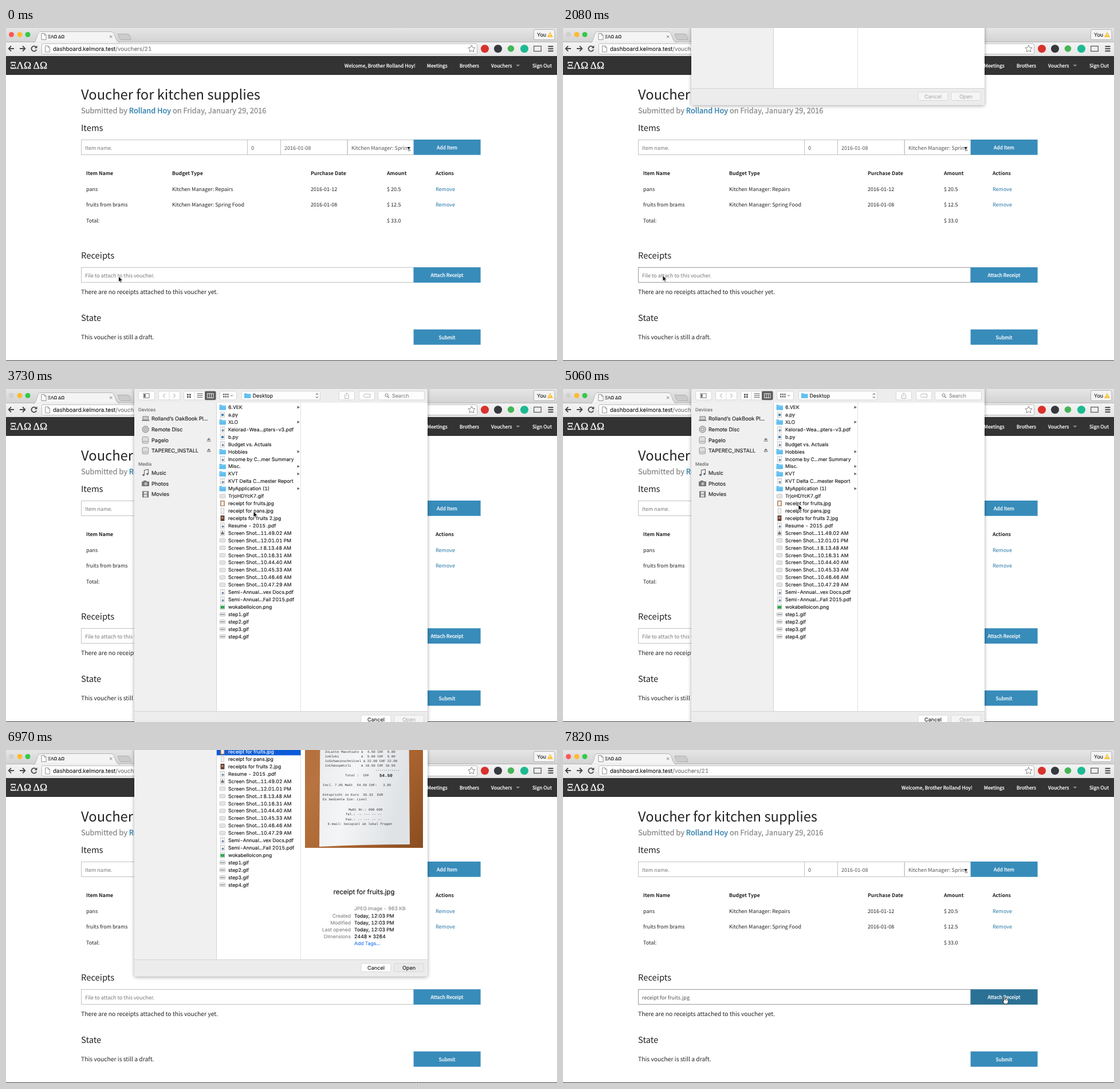
Write an HTML page that moves like this. It is 962 px wide and 582 px high and loops after 8 s.

```html
<!DOCTYPE html>
<html lang="en">
<head>
<meta charset="utf-8">
<title>Voucher dashboard</title>
<style>
html, body { margin: 0; width: 100%; height: 100%; overflow: hidden; background: #fff; }
svg { display: block; width: 962px; height: 582px; }
text { white-space: pre; text-rendering: geometricPrecision; }
.page { font-family: "Noto Sans CJK JP", "Noto Sans CJK SC", "Noto Sans CJK", "Open Sans", sans-serif; }
.ui { font-family: Inter, Roboto, sans-serif; font-variant-numeric: tabular-nums; stroke: currentColor; stroke-width: .15; }
.serif { font-family: "Liberation Serif", "Noto Serif", serif; }
.mono { font-family: "Liberation Mono", "DejaVu Sans Mono", monospace; }
</style>
</head>
<body>
<svg id="stage" viewBox="0 0 962 582" xmlns="http://www.w3.org/2000/svg"></svg>
<script>
const LOOP = 8000;

// ---- markup helpers ----
const attrs = o => Object.entries(o).map(([k, v]) => ` ${k}="${v}"`).join('');
const rect = (x, y, w, h, fill, o = {}) =>
  `<rect x="${x}" y="${y}" width="${w}" height="${h}" fill="${fill}"${attrs(o)}/>`;
const disc = (x, y, r, fill, o = {}) => `<circle cx="${x}" cy="${y}" r="${r}" fill="${fill}"${attrs(o)}/>`;
const path = (d, fill, o = {}) => `<path d="${d}" fill="${fill}"${attrs(o)}/>`;
const line = (d, stroke, width = 1, o = {}) => path(d, 'none', { stroke, 'stroke-width': width, ...o });
const text = (cls, x, y, size, fill, str, o = {}) =>
  `<text class="${cls}" x="${x}" y="${y}" font-size="${size}" fill="${fill}" color="${fill}"${attrs(o)}>${str}</text>`;
const group = (id, body, o = {}) => `<g id="${id}"${attrs(o)}>${body}</g>`;
const page = (...a) => text('page', ...a);
const ui = (...a) => text('ui', ...a);
const mid = { 'text-anchor': 'middle' };
const end = { 'text-anchor': 'end' };
const heavy = (c, w = .25) => ({ stroke: c, 'stroke-width': w });

// ---- browser frame ----
const letters = 'ΞΛΩ ΔΩ';
const sheetIcon = (x, y) =>
  path(`M${x} ${y}h5l3 3v8h-8zM${x + 5} ${y}v3h3`, '#fff', { stroke: '#777', 'stroke-width': .8 });

const browser = () => rect(0, 0, 962, 25, 'url(#strip)') +
  rect(0, 24, 962, 25, 'url(#bar)') + line('M0 24.5H962', '#b4b4b4') +
  path('M48 25C55 25 53 6.5 60 6.5H184C191 6.5 190 25 198 25Z', '#f4f4f4', { stroke: '#ababab', 'stroke-width': .8 }) +
  rect(50, 24.5, 146, 1.5, '#f4f4f4') +
  path('M195 10.5H212Q215 10.5 216 13L218 20.5H202Q199 20.5 198 18Z', '#cbcbcb', { stroke: '#a8a8a8', 'stroke-width': .8 }) +
  disc(9.5, 11.5, 4.5, '#fc5753', { id: 'closeDot' }) + disc(24, 11.5, 4.5, '#fdbb32') + disc(38, 11.5, 4.5, '#36c84b') +
  sheetIcon(62, 9.5) + ui(73, 18, 7.6, '#111', letters) +
  line('M181 13l4.4 4.4M185.4 13l-4.4 4.4', '#777', 1) +
  rect(921.5, 2.5, 36.5, 18, '#f4f4f4', { rx: 2.5, stroke: '#b2b2b2' }) + ui(927, 15.2, 9, '#222', 'You') +
  path('M950 6.8L955 16H945Z', '#f8c231') + line('M950 10v3M950 14v1', '#fff', 1) +
  line('M14 36H5M9 31.5L4.6 36L9 40.5', '#484848', 1.8) +
  line('M24 36H33M29 31.5L33.4 36L29 40.5', '#484848', 1.8) +
  line('M52.6 33.5A4.5 4.5 0 1 0 53.2 37.5', '#484848', 1.8) + path('M54.4 30.5V35.3H49.6Z', '#484848') +
  rect(62.5, 27.5, 760, 18, '#fff', { rx: 2, stroke: '#b9b9b9' }) + sheetIcon(68.5, 31) +
  ui(82, 39.8, 9.85, '#222', 'dashboard.kelmora.test<tspan fill="#777" color="#777">/vouchers/21</tspan>') +
  path('M813 30l1.9 4 4.3.5-3.2 3 .9 4.3-3.9-2.2-3.9 2.2.9-4.3-3.2-3 4.3-.5z', '#fff', { stroke: '#777', 'stroke-width': .9 }) +
  disc(836, 36.3, 7, '#d8322c') + disc(859, 36.3, 7, '#37393f') + disc(881.5, 36, 5.8, '#45b556') +
  disc(905, 36.3, 7, '#1cba93') +
  rect(921.7, 31.6, 12.6, 9, 'none', { stroke: '#555', 'stroke-width': 1.2 }) +
  line('M946.5 32.2h9M946.5 36.2h9M946.5 40.2h9', '#444', 1.9);

// ---- web page ----
const person = 'Rolland Hoy';
const white = heavy('#fff', .28);
const button = (y, label, id = 'b' + y) =>
  rect(711.6, y, 117, 26.8, '#388cba', { id }) + page(770, y + 16.8, 8.55, '#fff', label, { ...mid, ...white });
const field = (x, y, w, id = 'i' + x) => rect(x + .5, y + .5, w, 26, '#fff', { id, stroke: '#c2c2c2' });
const cols = [140, 290, 532, 665, 750];
const row = (y, cells, o = {}, size = 9) => cells.map((c, i) =>
  c && page(cols[i], y, size, c === 'Remove' ? '#2678a8' : '#222', c, o)).join('');

const site = () => rect(0, 49, 962, 533, '#fff') + rect(0, 49, 962, 33, '#333') +
  text('serif', 7, 71, 17.6, '#fff', letters, heavy('#fff', .3)) +
  [[591, `Welcome, Brother ${person}!`], [735, 'Meetings'], [792, 'Brothers'], [847, 'Vouchers'], [919, 'Sign Out']]
    .map(([x, s]) => page(x, 69, 8.5, '#fff', s, white)).join('') +
  path('M890.3 64h7l-3.5 3.6z', '#8b8b8b') +
  page(131, 125.3, 23.75, '#222', 'Voucher for kitchen supplies') +
  page(131, 148.7, 12.92, '#888', `Submitted by <tspan fill="#2678a8" stroke="#2678a8">${person}</tspan> on Friday, January 29, 2016`, heavy('#888')) +
  page(131, 180, 14.8, '#222', 'Items') +
  field(131, 195, 290) + field(421, 195, 58) + field(479, 195, 116.5) + field(596, 195, 116) +
  page(138, 212.5, 9.05, '#777', 'Item name.') + page(428, 212.5, 9.05, '#555', '0') +
  page(486, 212.5, 9.05, '#555', '2016-01-08') + page(603, 212.5, 9.05, '#555', 'Kitchen Manager: Spring') +
  path('M700.5 208h5l-2.5 4z', '#111') + button(195, 'Add Item') +
  row(257, ['Item Name', 'Budget Type', 'Purchase Date', 'Amount', 'Actions'], { 'font-weight': 700 }, 8.75) +
  row(285, ['pans', 'Kitchen Manager: Repairs', '2016-01-12', '$ 20.5', 'Remove']) +
  row(312.3, ['fruits from brams', 'Kitchen Manager: Spring Food', '2016-01-08', '$ 12.5', 'Remove']) +
  row(339.6, ['Total:', '', '', '$ 33.0', '']) +
  page(131, 403, 14.8, '#222', 'Receipts') +
  field(131, 418, 580.5, 'fileBox') + page(138, 435.8, 9.05, '#777', '', { id: 'fileText' }) +
  button(418.2, 'Attach Receipt', 'attach') +
  page(131, 465, 10.32, '#222', 'There are no receipts attached to this voucher yet.') +
  page(131, 511.7, 14.8, '#222', 'State') +
  page(131, 543.8, 10.32, '#222', 'This voucher is still a draft.') + button(526.8, 'Submit') +
  rect(0, 581, 962, 1, '#3a3d40');

// ---- file sheet: kind letter, then name ----
const shots = ['11.49.02 AM', '12.01.01 PM', 't 8.13.48 AM', '10.16.31 AM', '10.44.40 AM', '10.45.33 AM', '10.46.46 AM', '10.47.29 AM'];
const files = ['d6.VEK', 'pa.py', 'dXLO', 'fKelorad-Wea...pters-v3.pdf', 'pb.py', 'fBudget vs. Actuals', 'dHobbies',
  'fIncome by C...mer Summary', 'dMisc.', 'dKVT', 'fKVT Delta C...mester Report', 'dMyApplication (1)', 'gTrjoHDYcK7.gif',
  'rreceipt for fruits.jpg', 'breceipt for pans.jpg', 'breceipts for fruits 2.jpg', 'fResume - 2015 .pdf',
  ...shots.map((s, i) => (i ? 'g' : 'k') + 'Screen Shot...' + s),
  'fSemi-Annual...vex Docs.pdf', 'fSemi-Annual...Fall 2015.pdf', 'nwokabelloicon.png',
  'sstep1.gif', 'sstep2.gif', 'sstep3.gif', 'sstep4.gif'];
const thin = c => ({ stroke: c, 'stroke-width': .7 });
const leaf = y => rect(374.5, y - 4.8, 7, 9.6, '#fff', thin('#b3b3b3'));
const card = (y, c) => rect(373.3, y - 3, 9.4, 6.2, c, { rx: 1.2, ...thin('#a5a5a5') });
const icons = {
  d: y => path(`M372.5 ${y - 4.5}h4l1 1.2h6.5v8h-11.5z`, '#62bff0') + rect(372.5, y - 2.2, 11.5, .6, '#9ddcfa'),
  f: y => leaf(y) + rect(376, y - 3.3, 4, 1, '#c8c8c8') + disc(378.5, y + 1.5, 2, '#7489a3'),
  p: y => leaf(y) + rect(376, y - 1.8, 4.2, 4.2, '#4b83b5'),
  g: y => card(y, '#ececec') + rect(375, y - .3, 6, .8, '#c4c4c4'),
  s: y => card(y, '#f2f2f2') + rect(374.3, y - .4, 7.4, 1.3, '#777'),
  k: y => leaf(y) + rect(375.5, y - 1, 5, 4, '#777') + rect(377, y - 3, 2, 2.5, '#777'),
  r: y => rect(374.2, y - 4.8, 7.6, 9.6, '#a8683a') + rect(375.5, y - 3.6, 5, 7.4, '#f3f0ec'),
  b: y => rect(374.6, y - 4.8, 6.8, 9.6, '#60382b') + rect(376.2, y - 3, 3.4, 4.4, '#a88574'),
  n: y => leaf(y) + rect(374.5, y - 2.2, 7, 5.4, '#3aa657')
};
const fileRow = (name, i) => {
  const y = 32 + 12.92 * i;
  return icons[name[0]](y) +
    ui(388, y + 3.1, 8.6, '#1a1a1a', name.slice(1), { id: 'file' + i }) +
    (name[0] === 'd' ? path(`M508.5 ${y - 2.4}l4.4 2.4-4.4 2.4z`, '#666') : '');
};

const pill = (x, w, fill = '#fdfdfd') => rect(x + .5, 4, w, 15, fill, { rx: 2.5, stroke: '#d0d0d0', 'stroke-width': .8 });
const toolbar = () => pill(231, 28) + rect(240, 8, 10, 7.5, 'none', thin('#444')) + rect(241, 9, 2.6, 5.5, '#666') +
  pill(266, 37) + line('M285 4V19', '#d4d4d4', .8) +
  line('M277.5 8l-3 3.6 3 3.6M292.5 8l3 3.6-3 3.6', '#999', 1) +
  pill(310, 56) + rect(347, 3.8, 19.5, 15.4, '#5d5d5d', { rx: 2 }) + line('M329 4V19', '#d4d4d4', .8) +
  [0, 4].map(a => [0, 4].map(b => rect(316 + a, 8.5 + b, 2.8, 2.8, '#555')).join('')).join('') +
  line('M333.5 8.5h10M333.5 11.6h10M333.5 14.7h10', '#555', 1) +
  rect(351.5, 8, 10.5, 7.5, 'none', { stroke: '#fff', 'stroke-width': .9 }) + line('M355 8v7.5M358.5 8v7.5', '#fff', .9) +
  pill(373, 29) + [0, 3.6, 7.2].map(a => [0, 4].map(b => rect(379 + a, 8.2 + b, 2.5, 2.5, '#666')).join('')).join('') +
  line('M392 10.4l2 2 2-2', '#555', 1) +
  pill(411, 137) + path('M416 7.5h4l1 1h6.5v7.5h-11.5z', '#62bff0') + ui(430.5, 15, 9.1, '#222', 'Desktop') +
  line('M541 10l2-2.3 2 2.3M541 13.3l2 2.3 2-2.3', '#444', 1) +
  pill(581, 27) + pill(616, 27) + group('tools',
    line('M592.5 10h-1v6.5h7v-6.5h-1M595 13V7M593 8.7l2-2 2 2', 'currentColor', .9) +
    path('M623.5 11.6l2.5-2.8h9.5v5.6h-9.5z', 'none', { stroke: 'currentColor', 'stroke-width': .9 })) +
  pill(649, 81) + disc(664.5, 11, 2.6, 'none', { stroke: '#777' }) + line('M666.4 13l2.5 2.6', '#777', 1.1) +
  ui(674, 15, 9, '#888', 'Search');

const places = [['Rolland’s OakBook Pl...', 55], ['Remote Disc', 74], ['Pagelo', 92.6], ['TAPEREC_INSTALL', 111.2],
  ['Music', 150], ['Photos', 168.7], ['Movies', 187.4]];
const drive = y => rect(238, y - 5.5, 10.5, 11.5, '#ddd', { rx: 2, ...thin('#777') }) + line(`M239 ${y + 2.5}h8.5`, '#888', .8) +
  path(`M350.7 ${y}l3.4-3.6 3.4 3.6zM350.7 ${y + 1.2}h6.8v1.2h-6.8z`, '#777');
const sidebar = () => [['Devices', 38.8], ['Media', 133.7]].map(([s, y]) => ui(231, y, 7.9, '#777', s, { 'font-weight': 500 })).join('') +
  places.map(([s, y]) => ui(254, y, 9.2, '#222', s)).join('') +
  rect(239, 48, 9.5, 6, '#ccc', thin('#555')) + rect(237, 54.4, 13.5, 1.3, '#666') +
  disc(243.6, 70.5, 5.7, '#c5c5c5', thin('#666')) + disc(243.6, 70.5, 1.8, '#f4f4f4', thin('#777')) +
  drive(89) + drive(107.6) +
  line('M241.5 150v-8l7-1.5v8', '#666', 1.1) + disc(240, 150.3, 1.8, '#666') + disc(247, 148.6, 1.8, '#666') +
  rect(237, 161.5, 13, 8.5, '#777', { rx: 1 }) + rect(240, 160, 5, 2, '#777') + disc(244, 165.7, 2.6, '#bbb') +
  rect(238, 178.5, 11, 11, '#777') + rect(240.5, 179.6, 6, 3.9, '#e0e0e0') + rect(240.5, 184.6, 6, 3.9, '#e0e0e0');

// Receipt slip: [baseline, x, words]
const slip = [[153.2, 598, '0000 Birkenau'], [160.5, 598, 'Familie O.Tann'],
  [177, 554, 'Wasch.Nr. 4572   30.07.2007/13:29:17'], [185, 554, 'Bar                    Tisch  7/01'],
  [202, 557, '2xLatte Macchiato à  4.50 CHF  9.00'], [210, 557, '1xGloki           à  5.00 CHF  5.00'],
  [218, 557, '1xSchweinschnitzel à 22.00 CHF 22.00'], [226, 557, '1xChässpätzli     à 18.50 CHF 18.50'],
  [234, 645, '------------'], [243, 592, 'Total :  CHF'],
  [260, 553, 'Incl. 7.6% MwSt  54.50 CHF:   3.85'], [277, 553, 'Entspricht in Euro  36.33  EUR'],
  [285, 553, 'Es bediente Sie: Liesl'], [302.5, 598, 'MwSt Nr.: 000 000'], [311, 593, 'Tel.: -- --- -- --'],
  [319.5, 593, 'Fax.: -- --- -- --'], [328, 562, 'E-mail: beispiel im lokal fragen']];
const preview = () => rect(522, 95, 206, 273, 'url(#wood)') +
  path('M549 110L703 110L705 362Q625 362 547 366Z', 'url(#paper)') +
  text('mono', 624, 136.5, 7.4, '#222', 'Waldgasthof', { ...mid, 'font-weight': 700 }) +
  text('mono', 624, 145, 7.4, '#222', 'Kleine Buchenalp', { ...mid, 'font-weight': 700 }) +
  slip.map(([y, x, s]) => text('mono', x, y, 5.85, '#333', s)).join('') +
  text('mono', 652, 243.5, 7.6, '#222', '54.50', { 'font-weight': 700 }) +
  ui(625, 449, 11.5, '#111', 'receipt for fruits.jpg', mid) + ui(608, 476.5, 8.6, '#8a8a8a', 'JPEG image - 963 KB') +
  [['Created', 'Today, 12:03 PM'], ['Modified', 'Today, 12:03 PM'], ['Last opened', 'Today, 12:03 PM'], ['Dimensions', '2448 × 3264']]
    .map(([k, v], i) => ui(602, 489.5 + i * 12.3, 8.6, '#8a8a8a', k, end) + ui(608, 489.5 + i * 12.3, 8.6, '#111', v)).join('') +
  ui(608, 538.4, 8.6, '#2a7df0', 'Add Tags...');

const action = (x, id, s) => rect(x, 570, 52, 14.5, '#fff', { id: id + 'Box', rx: 2.5, stroke: '#d2d2d2', 'stroke-width': .8 }) +
  ui(x + 26, 580.6, 9.1, '#222', s, { id, ...mid });
const sheet = () => rect(224, -20, 512, 612.5, '#ececec', { rx: 3, filter: 'url(#shade)' }) +
  rect(224, 0, 143.5, 563, '#f0f0f0') + rect(368, 24, 368, 539, '#fff') +
  rect(224, 0, 512, 24, '#ededed') + line('M367.5 24V563M224 563.5H736', '#d2d2d2') + line('M514.5 24V563', '#e1e1e1') +
  group('side', sidebar()) +
  group('list', toolbar() + rect(368, 193.7, 146.5, 12.6, '#0d5cd7', { id: 'mark' }) + files.map(fileRow).join('') +
    group('thumb', rect(373, 207.5, 10, 11, '#fff') + rect(375.3, 208.3, 5.4, 9.4, '#f1f1f1', thin('#b5b5b5')))) +
  group('preview', preview()) + action(620, 'cancel', 'Cancel') + action(677.5, 'open', 'Open');

const grad = (id, x2, y2, ...stops) => `<linearGradient id="${id}" x1="0" y1="0" x2="${x2}" y2="${y2}">` +
  stops.map((c, i) => `<stop offset="${i / (stops.length - 1)}" stop-color="${c}"/>`).join('') + '</linearGradient>';

document.getElementById('stage').innerHTML = '<defs>' +
  grad('strip', 0, 1, '#e6e6e6', '#d2d2d2') + grad('bar', 0, 1, '#f4f4f4', '#e6e6e6') +
  grad('wood', 1, 1, '#b06a38', '#b87440', '#a8632f', '#8a4c20') + grad('paper', 1, .4, '#e6e9ec', '#f4f5f6', '#e0e3e6') +
  '<filter id="shade" x="-10%" y="-10%" width="120%" height="120%"><feDropShadow dx="0" dy="1.5" stdDeviation="3" flood-opacity=".35"/></filter></defs>' +
  browser() + site() + group('sheet', sheet()) +
  group('arrow', path('M0 0V10L2.4 7.9L4 11.6L5.7 10.9L4.1 7.3H7.3Z', '#111', { stroke: '#fff', 'stroke-width': .8 })) +
  group('hand', path('M-1 1Q-1-.6 0-.6T1.1 1V4.2Q3-.1 6.6 4.4Q7.2 6 6.6 8.2L5.6 11.4H.4L-2.8 7.2Q-3.4 5.6-1 6.5Z', '#fff', { stroke: '#111', 'stroke-width': .9 }) +
    line('M2.8 4.2v1.6M4.7 4.4v1.5', '#111', .7));

// ---- timing ----
// Pointer moves: start, end, number of steps, way points
const moves = [[980, 980, 1, [190, 434]], [1190, 1190, 1, [174, 432.5]],
  [3030, 3820, 10, [200, 415], [300, 310], [400, 222], [432, 214], [437, 247]],
  [3900, 4170, 4, [425, 220]], [4710, 5060, 5, [411, 202]],
  [5410, 6190, 9, [500, 330], [640, 490], [722, 558]], [6270, 6530, 4, [717.5, 579]],
  [7260, 7260, 1, [726, 523]], [7410, 7410, 1, [733, 452]], [7560, 7560, 1, [748, 454]],
  [7730, 7730, 1, [766, 439]], [7820, 7820, 1, [770.5, 432.5]]];
const trail = [[0, 196.5, 434]];
for (const [t0, t1, n, ...way] of moves) {
  const pts = [trail.at(-1).slice(1), ...way];
  for (let k = 1; k <= n; k++) {
    const u = k / n * way.length, i = Math.min(Math.floor(u), way.length - 1);
    const at = a => pts[i][a] + (pts[i + 1][a] - pts[i][a]) * (u - i);
    trail.push([t0 + (n > 1 ? (t1 - t0) * (k - 1) / (n - 1) : 0), at(0), at(1)]);
  }
}
const drop = [[0, null], [1990, -545], [2080, -458], [2170, -250], [2270, -70], [2370, 0],
  [6890, -40], [6970, -197], [7120, -440], [7260, null]];
const border = [[0, '#c2c2c2'], [1460, '#adadad'], [1540, '#999'], [2700, '#c2c2c2'], [7730, '#999']];

const held = (keys, t) => keys.findLast(k => k[0] <= t + .01);
const el = id => document.getElementById(id);
const show = (id, on) => el(id).setAttribute('display', on ? 'inline' : 'none');
const paint = (id, c) => ['fill', 'color'].forEach(name => el(id).setAttribute(name, c));

function draw(t) {
  const y = held(drop, t)[1], picked = t >= 5230, ready = t >= 5410, attached = t >= 7730;
  show('sheet', y !== null);
  el('sheet').setAttribute('transform', `translate(0 ${y || 0})`);
  show('list', t >= 2520);
  show('side', t >= 2520 && t < 6890);
  show('thumb', t >= 2700);
  show('mark', picked);
  paint('file13', picked ? '#fff' : '#1a1a1a');
  show('preview', ready);
  el('tools').style.color = ready ? '#444' : '#b0b0b0';
  paint('cancel', t >= 2520 ? '#222' : '#b0b0b0');
  paint('open', ready ? '#222' : '#b0b0b0');
  paint('openBox', t >= 6710 ? '#e9e9e9' : ready ? '#fff' : '#f5f5f5');
  paint('cancelBox', t >= 2520 ? '#fff' : '#f5f5f5');
  paint('closeDot', t >= 1990 && t < 7410 ? '#cfcfcf' : '#fc5753');
  el('fileBox').setAttribute('stroke', held(border, t)[1]);
  el('fileText').textContent = attached ? 'receipt for fruits.jpg' : 'File to attach to this voucher.';
  paint('fileText', attached ? '#555' : '#777');
  paint('attach', attached ? '#2b7195' : '#388cba');
  const [, px, py] = held(trail, t);
  for (const id of ['arrow', 'hand']) {
    show(id, (id === 'hand') === attached);
    el(id).setAttribute('transform', `translate(${px} ${py})`);
  }
}

const start = performance.now();
function tick() {
  draw((performance.now() - start) % LOOP);
  requestAnimationFrame(tick);
}
tick();
</script>
</body>
</html>
```
